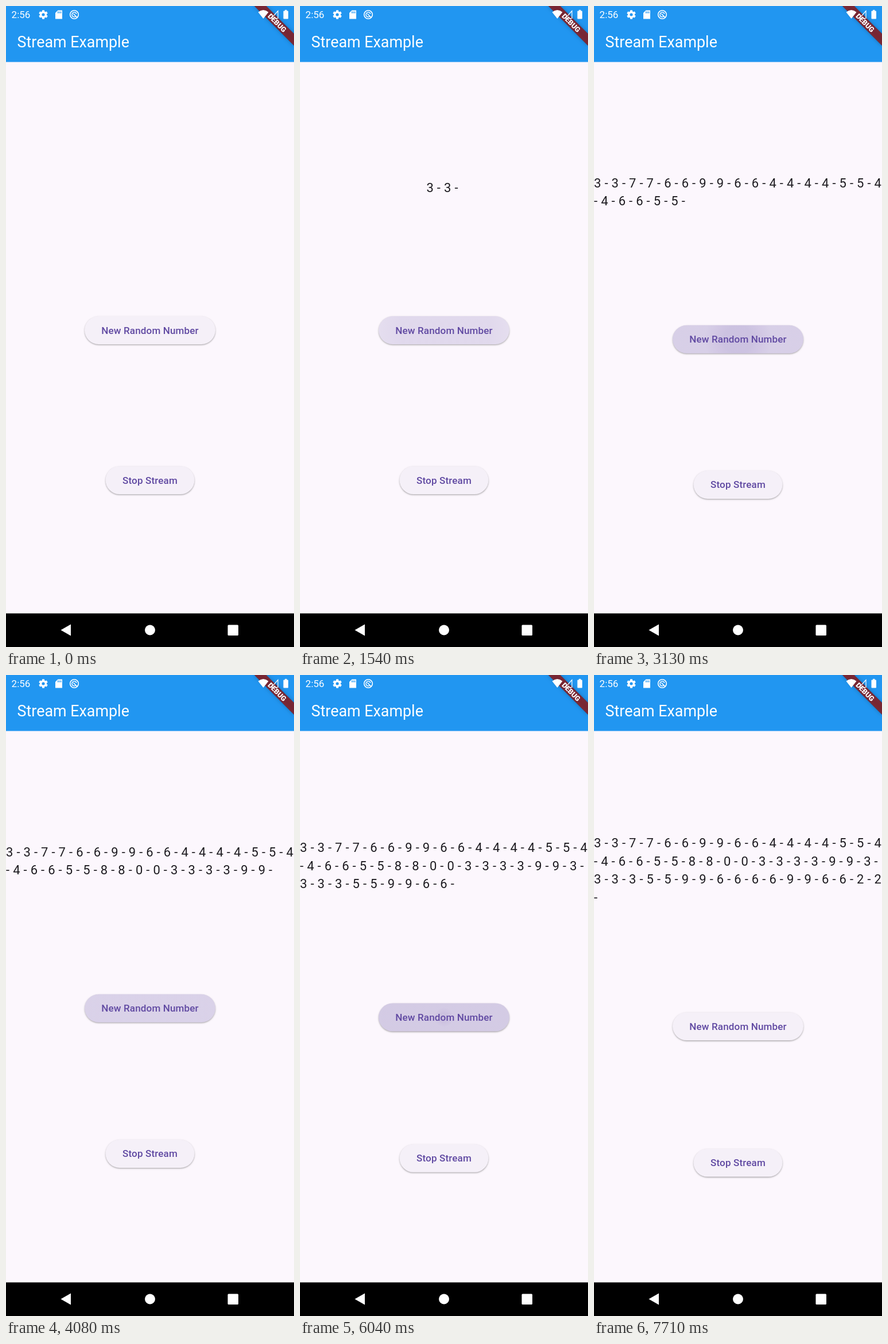
These frames come from a looping animation (502 by 1116 pixels, 7750 ms). An HTML page with a canvas:

```html
<!DOCTYPE html>
<html lang="en">
<head>
<meta charset="utf-8">
<title>Stream Example</title>
<style>
  html, body { margin: 0; width: 100%; height: 100%; overflow: hidden; background: #fcf7fd; }
  canvas { display: block; width: 502px; height: 1116px; }
</style>
</head>
<body>
<canvas id="stage" width="502" height="1116"></canvas>
<script>
const ctx = document.getElementById('stage').getContext('2d');
const W = 502, H = 1116, LOOP = 7750, TAU = Math.PI * 2;
const DP = W / 411;
const PRIMARY = '103,80,164';
const TOKENS_PER_LINE = 33;
const HOLD = 80;

// Two bursts of taps; each tap appends its digit twice.
const burst = (digits, start, step) =>
  [...digits].map((digit, i) => ({ digit, at: start + i * step }));
const taps = [
  ...burst('3769644546580339', 1370, 166),
  ...burst('335966962', 5200, 156)
];

const clamp = x => Math.max(0, Math.min(1, x));

// cubic-bezier(.4, 0, .2, 1)
function fastOutSlowIn(x) {
  let lo = 0, hi = 1;
  for (let i = 0; i < 18; i++) {
    const u = (lo + hi) / 2, v = 1 - u;
    if (1.2 * u * v * v + 0.6 * u * u * v + u * u * u < x) lo = u; else hi = u;
  }
  return lo * lo * (3 - 2 * lo);
}

function text(str, x, y, size, { color = '#fff', weight = 400, align = 'left', spacing = 0 } = {}) {
  ctx.font = `${weight} ${size}px Roboto, sans-serif`;
  ctx.letterSpacing = spacing + 'px';
  ctx.textAlign = align;
  ctx.fillStyle = color;
  ctx.fillText(str, x, y);
}

function poly(...pts) {
  ctx.beginPath();
  for (let i = 0; i < pts.length; i += 2) ctx.lineTo(pts[i], pts[i + 1]);
  ctx.closePath();
}

function disc(x, y, r) {
  ctx.beginPath();
  ctx.arc(x, y, r, 0, TAU);
  ctx.fill();
}

function box(x, y, w, h, r) {
  ctx.beginPath();
  ctx.roundRect(x, y, w, h, r);
  ctx.fill();
}

function debugBanner() {
  const h = 12 * DP, off = 40 * DP;
  ctx.save();
  ctx.translate(W, 0);
  ctx.rotate(Math.PI / 4);
  ctx.shadowColor = 'rgba(0,0,0,.5)';
  ctx.shadowBlur = 7;
  ctx.fillStyle = 'rgba(0,0,0,.5)';
  ctx.fillRect(-off, off - h, off * 2, h);
  ctx.shadowColor = 'transparent';
  ctx.fillStyle = 'rgba(183,28,28,.627)';
  ctx.fillRect(-off, off - h, off * 2, h);
  text('DEBUG', 0, off - h / 2 + 4.4, 10.2 * DP, { weight: 900, align: 'center' });
  ctx.restore();
}

function gear(x, y) {
  ctx.save();
  ctx.translate(x, y);
  for (let i = 0; i < 6; i++) {
    ctx.rotate(TAU / 6);
    poly(-2.6, -4, -1.8, -7.8, 1.8, -7.8, 2.6, -4);
    ctx.fill();
  }
  disc(0, 0, 5.8);
  ctx.fillStyle = '#2196f1';
  disc(0, 0, 2.6);
  ctx.restore();
}

function statusIcons() {
  text('2:56', 9.6, 21, 17);
  ctx.fillStyle = ctx.strokeStyle = '#fff';
  gear(65, 15);

  poly(90.5, 7.5, 98, 7.5, 98, 22.5, 86, 22.5, 86, 12);
  ctx.fill();
  ctx.fillStyle = '#2196f1';
  for (let i = 0; i < 3; i++) ctx.fillRect(90 + i * 2.5, 9.5, 1.3, 3.2);

  ctx.lineWidth = 1.6;
  ctx.beginPath();
  ctx.arc(119, 15, 7.3, 0, TAU);
  ctx.stroke();
  ctx.beginPath();
  ctx.arc(119, 15, 4, 0.7, TAU - 0.3);
  ctx.stroke();
  ctx.beginPath();
  ctx.moveTo(117.5, 13.5);
  ctx.lineTo(124, 20);
  ctx.stroke();

  ctx.fillStyle = '#fff';
  ctx.beginPath();
  ctx.moveTo(448.5, 22);
  ctx.lineTo(439.5, 10.8);
  ctx.quadraticCurveTo(448.5, 3.4, 457.5, 10.8);
  ctx.fill();

  ctx.lineWidth = 1.2;
  poly(474, 8.5, 474, 21.5, 462.5, 21.5);
  ctx.stroke();

  box(483.5, 8.5, 8.5, 14, 1);
  ctx.fillRect(486, 6.8, 3.6, 2);
}

function chrome() {
  ctx.fillStyle = '#2196f1';
  ctx.fillRect(0, 0, W, 97.5);
  text('Stream Example', 19.6, 72.3, 22 * DP);
  debugBanner();
  statusIcons();

  ctx.fillStyle = '#000';
  ctx.fillRect(0, 1057.5, W, H - 1057.5);
  ctx.fillStyle = '#fff';
  poly(95.5, 1086.5, 113, 1076.5, 113, 1096.5);
  ctx.fill();
  disc(251, 1086.5, 9);
  box(386.5, 1077.5, 18.5, 18.5, 1.5);
}

function inkLayers(cx, cy, t) {
  let press = 0;
  for (const { at } of taps) {
    const age = t - at;
    if (age < 0 || age > 617) continue;
    press = Math.max(press, age < HOLD ? age / 100 : 0.8 * clamp(1 - (age - HOLD) / 200));
    const p = age / 617;
    const alpha = 0.1 * Math.min(clamp(p / 0.13), clamp((1 - p) / 0.6));
    const r = 268 * fastOutSlowIn(clamp(p / 0.75)) * 1.3 + 0.1;
    const ink = ctx.createRadialGradient(cx, cy, 0, cx, cy, r);
    ink.addColorStop(0, `rgba(${PRIMARY},${alpha})`);
    ink.addColorStop(0.42, `rgba(${PRIMARY},${alpha})`);
    ink.addColorStop(1, `rgba(${PRIMARY},0)`);
    ctx.fillStyle = ink;
    ctx.fill();
  }
  ctx.fillStyle = `rgba(${PRIMARY},${press * 0.1})`;
  ctx.fill();
}

function button(label, cy, w, t) {
  const cx = W / 2, h = 40 * DP;
  ctx.save();
  ctx.shadowColor = 'rgba(0,0,0,.32)';
  ctx.shadowBlur = 2.5;
  ctx.shadowOffsetY = 1.3;
  ctx.fillStyle = '#f5f0f8';
  box(cx - w / 2, cy - h / 2, w, h, h / 2);
  ctx.restore();
  if (t !== undefined) inkLayers(cx, cy, t);
  text(label, cx, cy + 6, 14 * DP,
    { color: '#6049a2', weight: 500, align: 'center', spacing: 0.1 * DP });
}

function draw(t) {
  ctx.fillStyle = '#fcf7fd';
  ctx.fillRect(0, 0, W, H);

  const tokens = taps.filter(p => t >= p.at + HOLD)
    .flatMap(p => [p.digit, '-', p.digit, '-']);
  const lines = Math.max(1, Math.ceil(tokens.length / TOKENS_PER_LINE));
  const extra = lines - 1;
  const size = 18 * DP, spacing = 0.25 * DP, lineH = size * 1.43;

  for (let i = 0; i < lines; i++) {
    const line = tokens.slice(i * TOKENS_PER_LINE, (i + 1) * TOKENS_PER_LINE).join(' ') + ' ';
    ctx.font = `400 ${size}px Roboto, sans-serif`;
    ctx.letterSpacing = spacing + 'px';
    const x = lines > 1 ? 0 : (W - ctx.measureText(line).width) / 2;
    text(line, x, 323.8 - extra * lineH / 4 + i * lineH, size, { color: '#1d1b20', spacing });
  }

  button('New Random Number', 564.5 + extra * lineH / 2, 228, t);
  button('Stop Stream', 825.6 + extra * lineH / 4, 155);
  chrome();
}

function tick() {
  draw(performance.now() % LOOP);
  requestAnimationFrame(tick);
}
tick();
</script>
</body>
</html>
```
